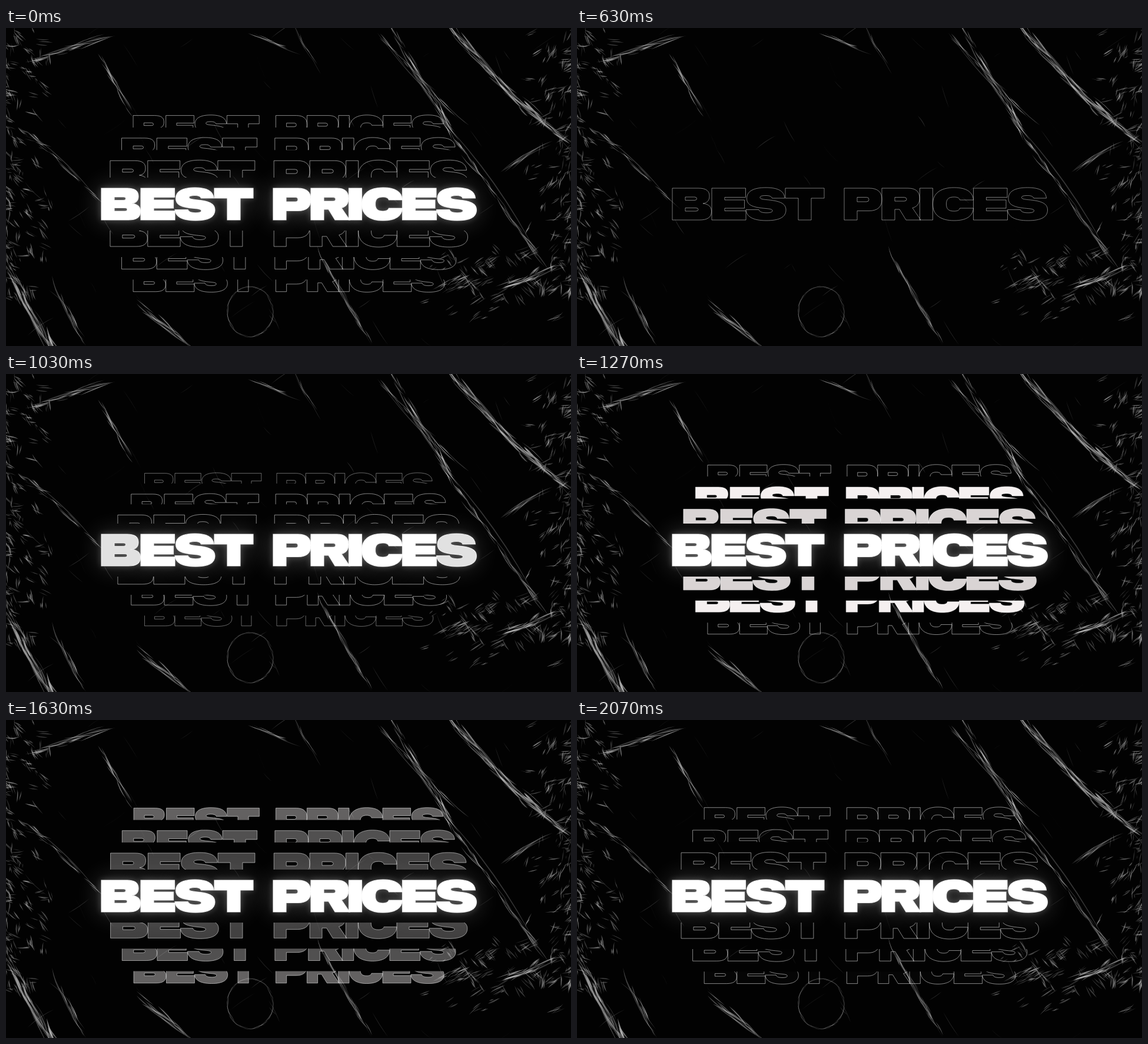
These frames come from a looping animation (960 by 540 pixels, 2.17 s). An HTML page with a canvas:

```html
<!DOCTYPE html>
<html lang="en">
<head>
<meta charset="utf-8">
<title>BEST PRICES</title>
<style>
  html, body { margin: 0; width: 100%; height: 100%; overflow: hidden; background: #000; }
  canvas { display: block; width: 960px; height: 540px; }
</style>
</head>
<body>
<canvas id="stage" width="960" height="540" role="img" aria-label="BEST PRICES">BEST PRICES</canvas>
<script>
const LOOP = 2170, FADE = 130, RESTART = 700;
const W = 960, H = 540, CX = 480, CY = 299, LEFT = 162;
const ctx = document.getElementById('stage').getContext('2d');

const clamp = v => Math.max(0, Math.min(1, v));
const ramp = (t, a, b) => clamp((t - a) / (b - a));

// Extended heavy capitals, 54 units high: advance and outline
const GLYPHS = {
  B: [67, 'M0 0H44C58 0 63 5 63 13.5C63 21 59 25 52 26C61 27 66.5 31 66.5 39.5C66.5 50 59 54 46 54H0Z' +
    'M22 15V20.5H38Q41.5 20.5 41.5 17.8T38 15Z M22 33.5V39H40Q44 39 44 36.2T40 33.5Z'],
  E: [58, 'M0 0H57.5V15.5H22V20H55.5V34H22V38.5H58V54H0Z'],
  S: [67, 'M34 -1C55 -1 65 5 66 17H44.5C43.5 14 40 12.5 34 12.5C27 12.5 24 13.5 24 15.8C24 18 27 18.8 35 19.6' +
    'C57 21.5 68 25.5 68 37C68 49.5 56 55 35 55C12 55 1 48.5 0 36.5H22C23 40 27 41.8 35 41.8' +
    'C42 41.8 45 40.6 45 38.2C45 36 42 35.2 33 34.4C11 32.5 1.5 28.5 1.5 17.5C1.5 5 13 -1 34 -1Z'],
  T: [66, 'M0 0H66V17H44V54H22V17H0Z'],
  P: [64, 'M0 0H42C57 0 64 6.5 64 19S57 38.5 42 38.5H22V54H0Z M22 15.5V23H38Q42 23 42 19.2T38 15.5Z'],
  R: [64.5, 'M0 0H44C58 0 64 6 64 17C64 26 60 31.5 52 33.5L66 54H41L30 36H22V54H0Z' +
    'M22 15.5V22H38Q42 22 42 18.8T38 15.5Z'],
  I: [22, 'M0 0H22V54H0Z'],
  C: [69, 'M36 -1C58 -1 68 7 69 20H46C45 16.5 42 15 36 15C27 15 23 18.5 23 27S27 39 36 39' +
    'C42 39 45 37.5 46 34H69C68 47 58 55 36 55C13 55 0 45 0 27S13 -1 36 -1Z'],
  ' ': [34, '']
};

// Letters around the origin, with their distance from the middle character
const line = new Path2D();
let pen = LEFT - CX;
const letters = [...'BEST PRICES'].map((ch, i) => {
  const [advance, outline] = GLYPHS[ch];
  const path = new Path2D();
  path.addPath(new Path2D(outline), new DOMMatrix([1, 0, 0, 1, pen, -27]));
  line.addPath(path);
  pen += advance;
  return { path, dist: Math.abs(i - 5) };
});

let seed = 77;
function rnd() {
  seed = (seed * 1664525 + 1013904223) >>> 0;
  return seed / 4294967296;
}
const spread = size => (rnd() - .5) * size;

// Main folds of the plastic film: from, to, width
const FOLDS = [
  [50, 52, 165, 18, 9], [160, 50, 212, 142, 5], [420, 8, 480, 36, 4], [490, 0, 527, 62, 2],
  [655, 0, 755, 165, 7], [735, 150, 905, 390, 6], [640, 20, 770, 155, 5],
  [755, 0, 850, 105, 11], [845, 100, 950, 192, 13], [840, 245, 912, 200, 5],
  [850, 440, 940, 404, 9], [530, 380, 622, 540, 5], [0, 405, 75, 540, 14],
  [84, 440, 136, 540, 6], [45, 182, 155, 290, 5], [235, 475, 312, 540, 9]
];

function sliver(g, x, y, angle, len, thick, alpha) {
  const dx = Math.cos(angle) * len / 2, dy = Math.sin(angle) * len / 2;
  const bend = spread(.4), lift = thick / len * 2;
  const mx = x - dy * bend, my = y + dx * bend;
  g.fillStyle = `rgba(205,205,205,${alpha})`;
  g.beginPath();
  g.moveTo(x - dx, y - dy);
  g.quadraticCurveTo(mx - dy * lift, my + dx * lift, x + dx, y + dy);
  g.quadraticCurveTo(mx + dy * lift, my - dx * lift, x - dx, y - dy);
  g.fill();
}

// A few parallel wrinkles
function tuft(g, x, y, angle, size, alpha) {
  for (let i = 1 + rnd() * 3; i > 0; i--) {
    sliver(g, x + spread(10), y + spread(10), angle + spread(.5), size * (.4 + rnd()), .6 + rnd() * 1.6, alpha * (.3 + rnd() * .7));
  }
}

function paintFilm() {
  const film = document.createElement('canvas');
  film.width = W;
  film.height = H;
  const g = film.getContext('2d');
  g.fillStyle = '#020202';
  g.fillRect(0, 0, W, H);

  for (const [x1, y1, x2, y2, width] of FOLDS) {
    const len = Math.hypot(x2 - x1, y2 - y1), angle = Math.atan2(y2 - y1, x2 - x1);
    sliver(g, (x1 + x2) / 2, (y1 + y2) / 2, angle, len, width * .3, .25);
    for (let n = len * (width + 4) / 70; n > 0; n--) {
      const k = rnd();
      sliver(g, x1 + (x2 - x1) * k + spread(width), y1 + (y2 - y1) * k + spread(width),
        angle + spread(.35), 14 + rnd() * 45, .6 + rnd() * width * .2, .2 + rnd() * .4);
    }
  }
  // wrinkles crowd towards both sides
  for (let i = 0; i < 230; i++) {
    const depth = rnd() ** 2 * 75, left = i % 2;
    tuft(g, left ? depth : W - depth, rnd() * 460, (left ? 1 : -1) * (.8 + spread(1.8)), 18, .5);
  }
  // crumpled corner
  for (let i = 0; i < 65; i++) {
    tuft(g, 830 + spread(130) + spread(130), 435 + spread(70) + spread(60), rnd() < .6 ? -.5 : .9, 20, .42);
  }
  // round crease
  for (let a = 0; a < 6.28; a += .2) {
    sliver(g, 415 + Math.cos(a) * 38, 482 + Math.sin(a) * 42, a + 1.57, 26, 1, .12 + rnd() * .3);
  }
  // loose faint scratches
  for (let i = 0; i < 70; i++) {
    sliver(g, rnd() * W, rnd() * H, rnd() < .6 ? 1 + spread(.6) : -.6, 15 + rnd() * 40, 1, rnd() * .22);
  }
  return film;
}
const film = paintFilm();

// Copies slide out behind the main line; index 0 is the nearest.
// inner is the edge of the line in front; the copy's own edge is returned.
function drawRow(i, side, inner, t) {
  const lag = t < RESTART ? 0 : Math.exp((RESTART - t) / 200);
  const scale = .953 - .0615 * i - (.213 + .053 * i) * lag;
  const off = 48 + 40 * i - (68 + 14 * i) * lag - (side > 0 ? 1.7 : 0);
  const edge = off + 27 * scale, limit = inner + 18;
  const show = t < RESTART
    ? 1 - ramp(t, FADE, 530 + 50 * i) ** 2.2
    : ramp(t, 820 + 30 * i, 960 + 60 * i);
  if (edge <= limit || !show) return edge;

  const age = t - 1220 - 50 * i;
  ctx.save();
  ctx.beginPath();
  ctx.rect(0, side < 0 ? 0 : CY + limit, W, side < 0 ? CY - limit : H);
  ctx.clip();
  ctx.translate(CX, CY + side * off);
  ctx.scale(scale, scale);
  ctx.globalAlpha = ramp(age, -10, 0) * (1 - ramp(age, 0, 840)) ** 2;
  ctx.fillStyle = '#f6f1f1';
  ctx.fill(line, 'evenodd');
  ctx.globalAlpha = show * .58;
  ctx.lineWidth = .9 / scale;
  ctx.strokeStyle = '#fff';
  ctx.stroke(line);
  ctx.restore();
  return edge;
}

// All letters fade together, then refill from the middle outwards
function fillOf(dist, t) {
  if (t < RESTART) return 1 - ramp(t, FADE, 630) ** 2.7;
  return clamp(6.26 * (1 - Math.exp((RESTART - t) / 118)) - dist);
}

function drawMain(t) {
  const fills = letters.map(l => fillOf(l.dist, t));
  const each = paint => letters.forEach((l, i) => paint(l.path, fills[i]));
  ctx.save();
  ctx.translate(CX, CY);

  // halo only: the shapes sit off stage, their shadows fall on it
  ctx.save();
  ctx.translate(-2000, 0);
  ctx.shadowOffsetX = 2000;
  for (const blur of [44, 12]) {
    ctx.shadowBlur = blur;
    ctx.shadowColor = 'rgba(255,255,255,.27)';
    each((path, fill) => {
      ctx.globalAlpha = fill;
      ctx.fill(path, 'evenodd');
    });
  }
  ctx.restore();

  each((path, fill) => {
    if (!fill) return;
    ctx.globalAlpha = 1;
    ctx.fillStyle = '#000';
    ctx.fill(path, 'evenodd');
    ctx.globalAlpha = fill;
    ctx.fillStyle = '#fff';
    ctx.fill(path, 'evenodd');
  });
  ctx.strokeStyle = '#fff';
  each((path, fill) => {
    ctx.lineWidth = .9 + .3 * fill;
    ctx.globalAlpha = .5 + .3 * fill;
    ctx.stroke(path);
  });
  ctx.restore();
}

function draw(t) {
  ctx.drawImage(film, 0, 0);
  for (const side of [-1, 1]) {
    let inner = 27;
    for (let i = 0; i < 3; i++) inner = drawRow(i, side, inner, t);
  }
  drawMain(t);
}

const start = performance.now();
function tick() {
  draw((performance.now() - start) % LOOP);
  requestAnimationFrame(tick);
}
tick();
</script>
</body>
</html>
```
